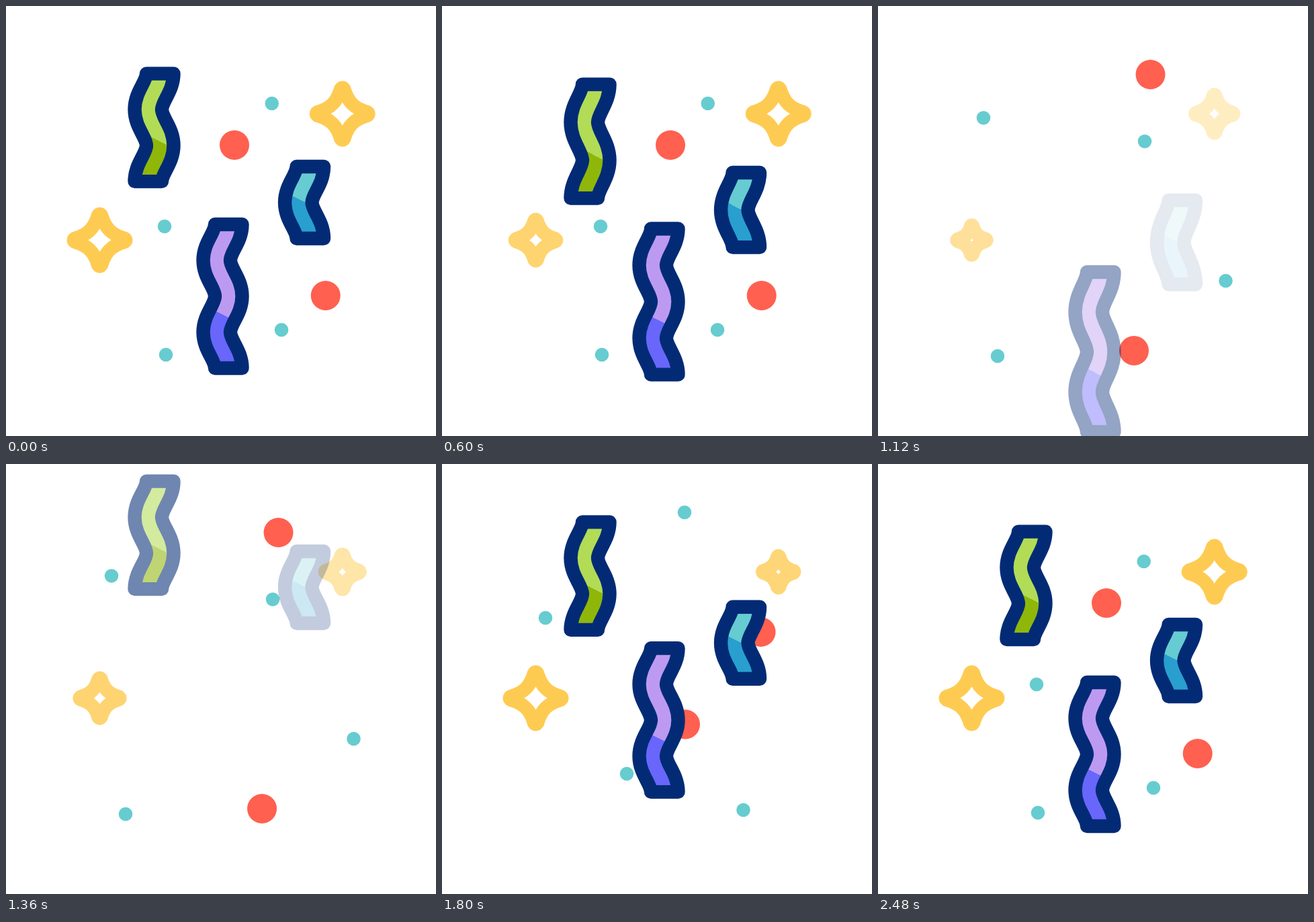
An HTML page that plays this animation: 640 by 640 pixels, repeating every 2600 ms.

```html
<!DOCTYPE html>
<html lang="en">
<head>
<meta charset="utf-8">
<title>Confetti</title>
<style>
  html, body { margin: 0; width: 100%; height: 100%; overflow: hidden; background: #fff; }
  svg { display: block; width: 100vw; height: 100vh; }
  .line { stroke-width: 20.4; stroke-linejoin: round; }
</style>
</head>
<body>
<svg id="stage" viewBox="0 0 640 640"></svg>
<script>
const LOOP = 2600, STEP = 40, FADE = 360;
const WIDTH = 40.5, SWAY = 17.5, HALF_WAVE = 53.5;

// drop, grow and settle are parabolas: [rate, time of rest]
const ribbons = [
  { x: 209, y: 100.6, waves: 3, fill: ['#b2dc56', '#8fb70a'], split: .513,
    drop: [.00833, 120], grow: [.00613, 110], settle: [.0111, 2140] },
  { x: 432.5, y: 239, waves: 2, fill: ['#66ccd1', '#299fcf'], split: .355,
    drop: [.00785, 218], grow: [.0043, 130], settle: [.0121, 2223] },
  { x: 311, y: 325, waves: 4, fill: ['#bd9af2', '#6966fb'], split: .56,
    drop: [.0113, 374], grow: [.006, 305], settle: [.0126, 2366] },
];

const stars = [
  { x: 139.5, y: 348.5, start: 15, period: 770,
    dim: { from: 346, dark: 1040, to: 1560, low: .51 } },
  { x: 500.7, y: 160.5, start: 948, period: 615,
    dim: { from: 890, dark: 1100, to: 2150, low: .34 } },
];

// each group of dots jumps to its next places after every hold
const dots = [
  { r: 22, color: '#ff6050', hold: 720, places: [
    [[340, 207], [475.7, 431]],
    [[405.5, 102], [381, 513]],
    [[474.5, 250], [362, 387.5]]] },
  { r: 10.3, color: '#66ccd0', hold: 800, places: [
    [[395.7, 145], [236, 328], [410, 482], [238, 519]],
    [[157, 166.5], [397, 201.5], [517.5, 409], [178, 521]],
    [[361, 72], [154, 229], [275, 461], [448.5, 515]]] },
];

const clamp = v => Math.min(1, Math.max(0, v));
const after = ([rate, rest], t) => (rate * Math.max(0, t - rest)) ** 2;
const before = ([rate, rest], t) => (rate * Math.max(0, rest - t)) ** 2;

// Outward bends are wide and inward bends tight, so the band keeps its width
function ribbonPath(x, y, h, waves) {
  const seg = h / waves, wide = seg * .48, tight = seg * .23;
  let right = '', left = '';
  for (let i = 0; i < waves; i++) {
    const inward = i % 2 === 0, dx = inward ? -SWAY : SWAY;
    const [a, b] = inward ? [wide, tight] : [tight, wide];
    right += `c0 ${a} ${dx} ${seg - b} ${dx} ${seg}`;
    left = `c0 ${-a} ${-dx} ${b - seg} ${-dx} ${-seg}` + left;
  }
  return `M${x} ${y}h${WIDTH}${right}h${-WIDTH}${left}z`;
}

// One arm with a blunt tip and a curve to the next, turned four times
function starPath(scale) {
  const arm = [[-2.5, -37], [0, -40.6], [2.5, -37], [8.5, -17.3], [17.3, -8.5], [37, -2.5]];
  let d = '';
  for (let turn = 0; turn < 4; turn++) {
    const c = Math.round(Math.cos(turn * Math.PI / 2));
    const s = Math.round(Math.sin(turn * Math.PI / 2));
    const p = arm.map(([x, y]) => [(x * c - y * s) * scale, (x * s + y * c) * scale]);
    d += `${turn ? 'L' : 'M'}${p[0]}Q${p[1]} ${p[2]}C${p[3]} ${p[4]} ${p[5]}`;
  }
  return d + 'z';
}

// Two pulses of size
function starSize({ start, period }, t) {
  const turns = Math.min(2, Math.max(0, (t - start) / period));
  return .775 + .225 * Math.cos(turns * 2 * Math.PI);
}

function starAlpha({ from, dark, to, low }, t) {
  const depth = Math.min((t - from) / (dark - from), (to - t) / (to - dark));
  return 1 - (1 - low) * clamp(depth);
}

function ribbonPose({ y, waves, drop, grow, settle }, i, t) {
  const h = waves * HALF_WAVE, delay = 120 * i;
  const leave = 679 + delay * .97, enter = 1155 + delay;
  return t < leave + FADE
    ? { y: y + after(drop, t), h: h + after(grow, t), alpha: 1 - clamp((t - leave) / FADE) }
    : { y: y - before(settle, t), h, alpha: clamp((t - enter) / FADE) };
}

const stage = document.getElementById('stage');
stage.innerHTML =
  '<defs>' + ribbons.map(({ waves, fill, split }, i) => {
    const skew = .5 * (WIDTH + SWAY) / (waves * HALF_WAVE);
    return `<linearGradient id="fill${i}" x1="0" y1="0" x2="0" y2="1"
      gradientTransform="matrix(1 ${skew} 0 1 0 0)">
      <stop offset="${split}" stop-color="${fill[0]}"/>
      <stop offset="${split}" stop-color="${fill[1]}"/></linearGradient>`;
  }).join('') + '</defs>' +
  stars.map(s => `<path class="star line" transform="translate(${s.x} ${s.y})"
    fill="none" stroke="#fecb52"/>`).join('') +
  dots.map(d => d.places[0].map(() =>
    `<circle class="dot" r="${d.r}" fill="${d.color}"/>`).join('')).join('') +
  ribbons.map((b, i) => `<g class="ribbon"><path class="line" fill="url(#fill${i})"
    stroke="#032b75"/></g>`).join('');

const starEls = stage.querySelectorAll('.star');
const dotEls = stage.querySelectorAll('.dot');
const ribbonEls = stage.querySelectorAll('.ribbon');

function draw(t) {
  stars.forEach((s, i) => {
    starEls[i].setAttribute('d', starPath(starSize(s, t)));
    starEls[i].setAttribute('opacity', starAlpha(s.dim, t));
  });

  const spots = dots.flatMap(d => d.places[Math.floor(t / d.hold) % 3]);
  spots.forEach(([x, y], i) => {
    dotEls[i].setAttribute('cx', x);
    dotEls[i].setAttribute('cy', y);
  });

  ribbons.forEach((b, i) => {
    const { y, h, alpha } = ribbonPose(b, i, t);
    ribbonEls[i].setAttribute('opacity', alpha);
    ribbonEls[i].firstChild.setAttribute('d', ribbonPath(b.x, y, h, b.waves));
  });
}

const began = performance.now();
function tick() {
  const t = Math.max(0, performance.now() - began);
  draw(Math.floor((t + 1) / STEP) * STEP % LOOP);
  requestAnimationFrame(tick);
}
tick();
</script>
</body>
</html>
```
